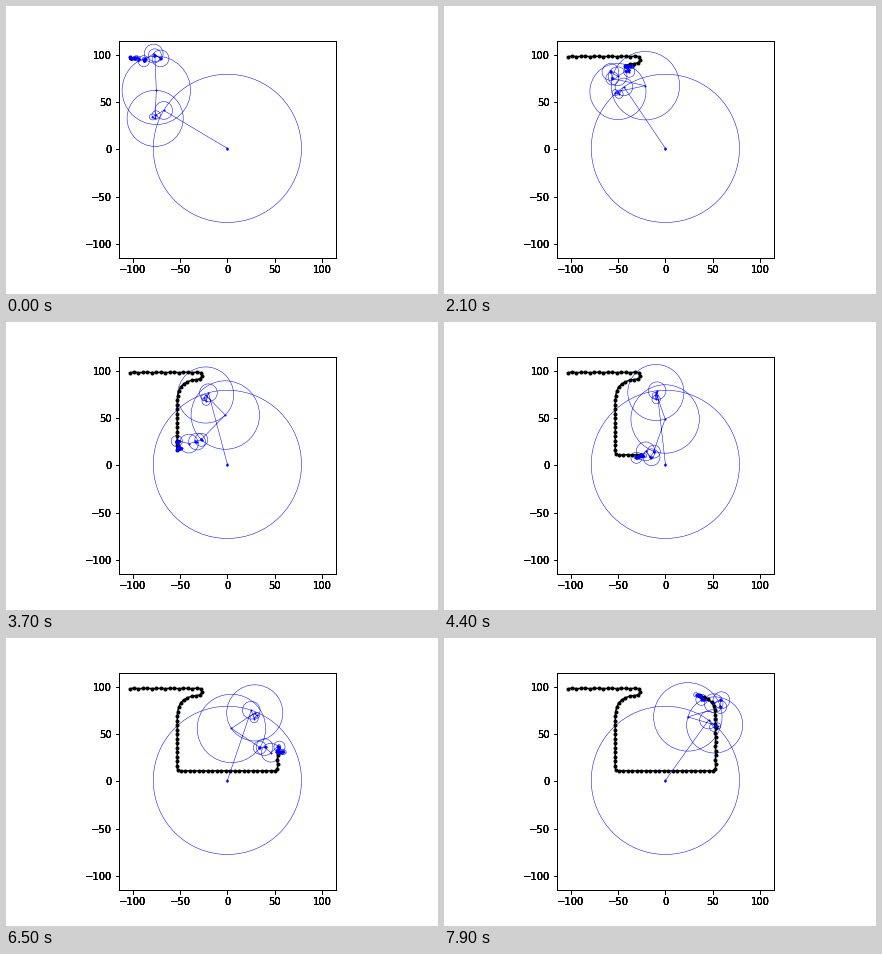
Write a matplotlib script that moves like this. It is 432 px wide and 288 px high and loops after 8 s.

```python
import numpy as np
import matplotlib.pyplot as plt
from matplotlib.animation import FuncAnimation
from matplotlib.collections import EllipseCollection

N = 300        # samples along the outline, one turn of the slowest circle
FRAMES = 80
ORDER = 100    # highest harmonic in either direction

LEFT, INNER, OUTER, RIGHT = 26.7, 53, 78, 103.7
TOP, SERIF, BRACKET = 98.2, 91.5, 67
BAR_TOP, BAR_BOTTOM = 11, 3


def bracket(x0, x1, sign):
    """Curve from a serif end (x0) into a stem edge (x1)."""
    t = np.linspace(0, 1, 40)
    p = [x0 + 1j * SERIF, x0 + 0.77 * (x1 - x0) + 90j, x1 + 84j, x1 + 1j * BRACKET]
    z = sum(w * q * (1 - t) ** (3 - j) * t ** j
            for j, (w, q) in enumerate(zip((1, 3, 3, 1), p)))
    return z if sign > 0 else z.conj()


def outline():
    """Serif letter H, clockwise from its top left corner, evenly sampled."""
    half = np.concatenate([
        [1j * BAR_TOP, INNER + 1j * BAR_TOP],
        bracket(LEFT, INNER, 1)[::-1],
        [LEFT + 1j * TOP, RIGHT + 1j * TOP],
        bracket(RIGHT, OUTER, 1),
        bracket(RIGHT, OUTER, -1)[::-1],
        [RIGHT - 1j * TOP, LEFT - 1j * TOP],
        bracket(LEFT, INNER, -1),
        [INNER + 1j * BAR_BOTTOM, 1j * BAR_BOTTOM],
    ])
    z = np.concatenate([half, -half[::-1].conj()])
    s = np.concatenate([[0], np.cumsum(abs(np.diff(z)))])
    corner = s[np.argmin(abs(z - (-RIGHT + 1j * TOP)))]
    at = (corner + s[-1] * np.arange(N) / N) % s[-1]
    return np.interp(at, s, z.real) + 1j * np.interp(at, s, z.imag)


coef = np.fft.fft(outline()) / N
freq = np.array([0] + [f for k in range(1, ORDER + 1) for f in (-k, k)])
amp = coef[freq]


def joints(i):
    arms = amp * np.exp(2j * np.pi * freq * i / N)
    return np.concatenate([[0], np.cumsum(arms)])


tips = np.array([joints(i)[-1] for i in range(FRAMES)])


def add_axes():
    ax = fig.add_axes([0.125, 0.125, 0.775, 0.755], facecolor="none")
    ax.set_aspect("equal")
    ax.set(xlim=(-115, 115), ylim=(-115, 115),
           xticks=range(-100, 101, 50), yticks=range(-100, 101, 50))
    return ax


fig = plt.figure(figsize=(6, 4), dpi=72)
# Stacked copies give the frame and labels their heavy, hard edges.
ax = [add_axes() for _ in range(4)][0]

trace, = ax.plot([], [], "k.-", lw=1.5, ms=6)
chain, = ax.plot([], [], "b.-", lw=0.5, ms=2)
size = 2 * abs(amp)
circles = EllipseCollection(size, size, np.zeros(len(size)), units="xy",
                            offsets=np.zeros((len(size), 2)),
                            offset_transform=ax.transData,
                            facecolors="none", edgecolors="b", linewidths=0.5)
ax.add_collection(circles, autolim=False)


def update(i):
    z = joints(i)
    chain.set_data(z.real, z.imag)
    circles.set_offsets(np.column_stack([z.real, z.imag])[:-1])
    trace.set_data(tips[:i + 1].real, tips[:i + 1].imag)
    return trace, chain, circles


anim = FuncAnimation(fig, update, frames=FRAMES, interval=100,
                     repeat=True, repeat_delay=0)
plt.show()
```
